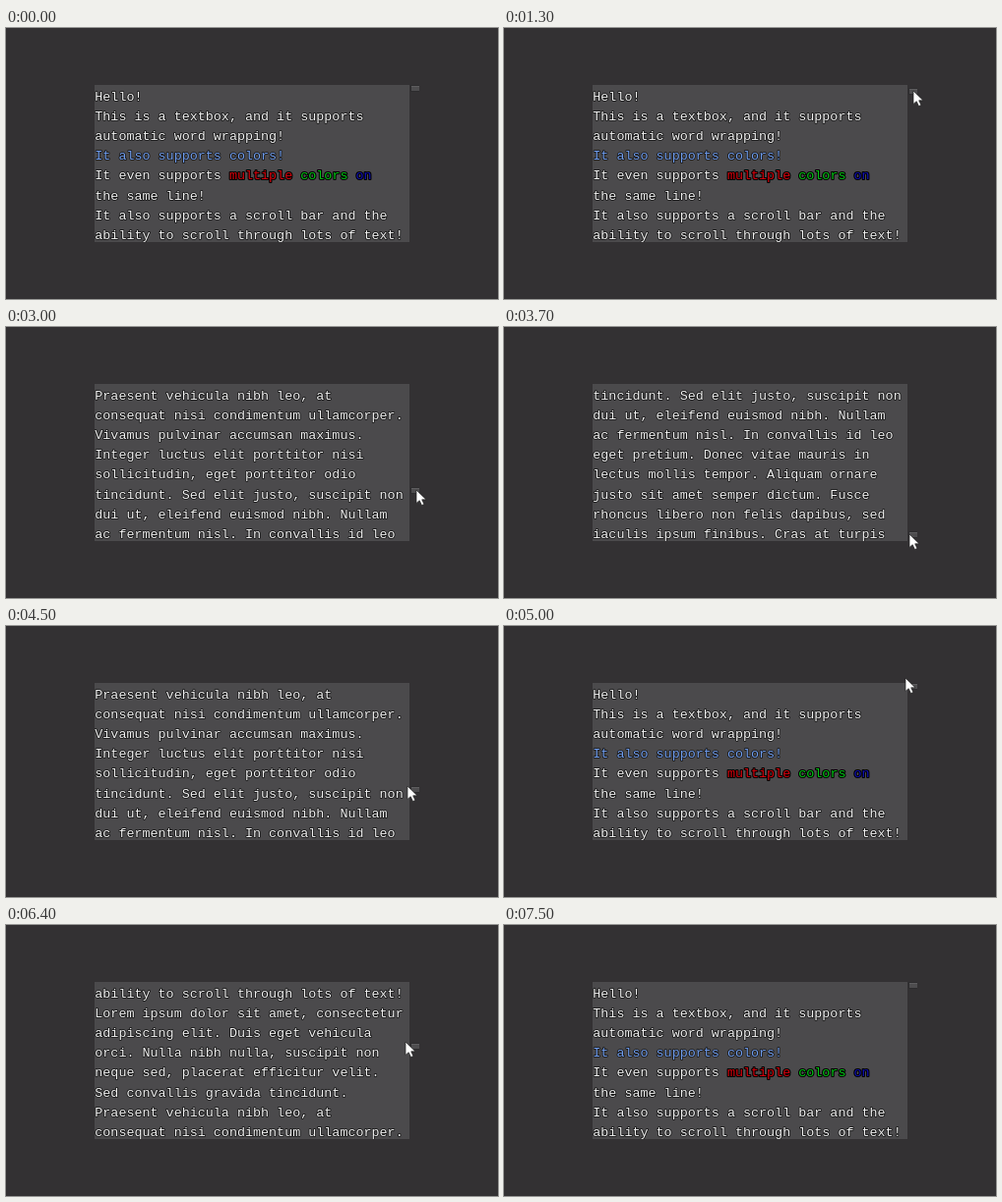
These frames come from a looping animation (500x276 px, 8400 ms). An HTML page:

```html
<!DOCTYPE html>
<html lang="en">
<head>
<meta charset="utf-8">
<title>Scrolling textbox</title>
<style>
  html, body { margin: 0; width: 100%; height: 100%; overflow: hidden; background: #333133; }
  svg { display: block; width: 500px; height: 276px; }
  text {
    font: 13.4px "Liberation Mono", monospace;
    fill: #f0f0f0; stroke: #161616; stroke-width: 1.6px; stroke-linejoin: round;
    paint-order: stroke; white-space: pre;
  }
  .sky { fill: #6f9cec; }
  .red { fill: #d8000c; }
  .green { fill: #00c414; }
  .navy { fill: #1010b4; }
  .red, .green, .navy { stroke: #000; stroke-width: 2.2px; }
</style>
</head>
<body>
<svg viewBox="0 0 500 276">
  <clipPath id="view"><rect x="90" y="58" width="320" height="160"/></clipPath>
  <rect x="90" y="58" width="320" height="160" fill="#4b4a4c"/>
  <g id="lines" clip-path="url(#view)"></g>
  <g id="thumb">
    <rect x="411" width="9" height="7" fill="#2d2c2e"/>
    <rect x="412" y="1" width="8" height="5" fill="#4e4d4f"/>
    <rect x="412" y="1" width="8" height="1" fill="#5e5d5f"/>
  </g>
  <path id="cursor" d="M0 0V13.4L3.2 10.7 5.5 15.6 7.9 14.5 5.7 9.8H10Z" fill="#fff" stroke="#222" stroke-width=".7"/>
</svg>
<script>
const LOOP = 8400, STEP = 100, SHOW = 900, HIDE = 7500;
const TOP = 58, BOTTOM = 211, BASELINE = 73.85, LINE_HEIGHT = 20.14;
const THUMB_PER_LINE = 8.03, LAG = 15;

// {class:words} marks a coloured run
const copy = `Hello!
This is a textbox, and it supports
automatic word wrapping!
{sky:It also supports colors!}
It even supports {red:multiple} {green:colors} {navy:on}
the same line!
It also supports a scroll bar and the
ability to scroll through lots of text!
Lorem ipsum dolor sit amet, consectetur
adipiscing elit. Duis eget vehicula
orci. Nulla nibh nulla, suscipit non
neque sed, placerat efficitur velit.
Sed convallis gravida tincidunt.
Praesent vehicula nibh leo, at
consequat nisi condimentum ullamcorper.
Vivamus pulvinar accumsan maximus.
Integer luctus elit porttitor nisi
sollicitudin, eget porttitor odio
tincidunt. Sed elit justo, suscipit non
dui ut, eleifend euismod nibh. Nullam
ac fermentum nisl. In convallis id leo
eget pretium. Donec vitae mauris in
lectus mollis tempor. Aliquam ornare
justo sit amet semper dictum. Fusce
rhoncus libero non felis dapibus, sed
iaculis ipsum finibus. Cras at turpis
sed nunc tristique malesuada.`;

// Pointer path: time, x, y
const path = [
  [900, 416, 60], [1100, 416, 60], [2100, 415, 111], [3000, 417, 166],
  [3900, 411, 215], [4500, 408, 163], [5050, 408, 51], [5600, 398, 160],
  [5950, 404, 219], [6400, 406, 119], [7000, 407, 44]
];

const $ = id => document.getElementById(id);
const clamp = (v, lo, hi) => Math.min(hi, Math.max(lo, v));

$("lines").innerHTML = copy.split("\n").map(line =>
  `<text x="90.3">${line.replace(/\{(\w+):([^}]*)\}/g, '<tspan class="$1">$2</tspan>')}</text>`
).join("");
const rows = [...$("lines").children];

// Tangent at a key; flat at the ends and where the direction reverses
function slope(i, axis) {
  const a = path[i - 1], b = path[i], c = path[i + 1];
  if (!a || !c || (b[axis] - a[axis]) * (c[axis] - b[axis]) <= 0) return 0;
  return (c[axis] - a[axis]) / (c[0] - a[0]);
}

function pointer(time, axis) {
  const t = clamp(time, path[0][0], path[path.length - 1][0]);
  const i = Math.max(1, path.findIndex(key => key[0] >= t));
  const a = path[i - 1], b = path[i], span = b[0] - a[0];
  const u = (t - a[0]) / span, v = 1 - u;
  return v * v * (1 + 2 * u) * a[axis] + u * u * (3 - 2 * u) * b[axis]
    + span * u * v * (v * slope(i - 1, axis) - u * slope(i, axis));
}

function draw(t) {
  const thumbY = clamp(pointer(t - LAG, 2) - 2, TOP, BOTTOM);
  const first = Math.floor((thumbY - TOP) / THUMB_PER_LINE);
  rows.forEach((row, i) => row.setAttribute("y", Math.round(BASELINE + (i - first) * LINE_HEIGHT)));
  $("thumb").setAttribute("transform", `translate(0 ${Math.round(thumbY)})`);
  $("cursor").setAttribute("transform",
    `translate(${Math.round(pointer(t, 1))} ${Math.round(pointer(t, 2))})`);
  $("cursor").setAttribute("visibility", t >= SHOW && t < HIDE ? "visible" : "hidden");
}

const start = performance.now();
function tick() {
  const t = (performance.now() - start) % LOOP;
  draw(Math.floor(t / STEP) * STEP);
  requestAnimationFrame(tick);
}
tick();
</script>
</body>
</html>
```
